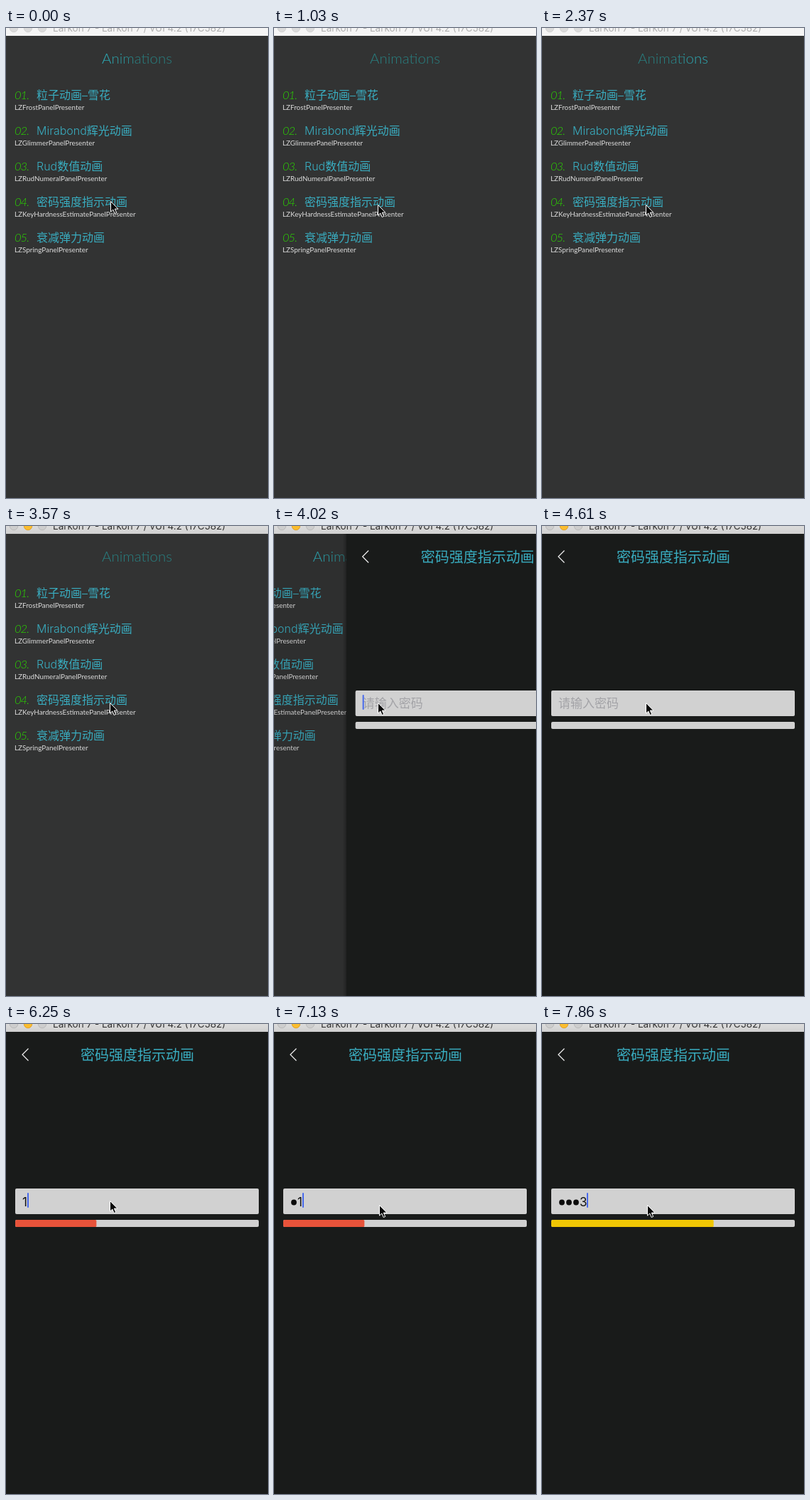
Animation of 369x660 px, one loop 8000 ms. Source, as an HTML page:

```html
<!DOCTYPE html>
<html lang="zh-CN">
<head>
<meta charset="utf-8">
<title>Animations</title>
<style>
  html, body { margin: 0; width: 100%; height: 100%; overflow: hidden; background: #323333; }
  svg { display: block; width: 100%; height: 100%; }
  text { white-space: pre; }
  .ui { font-family: Inter, "Noto Sans CJK SC", "Noto Sans CJK", "Noto Sans CJK JP", sans-serif; }
  .light { font-weight: 300; }
  .head { font: 300 20.5px Lato, sans-serif; }
  .num { font: italic 300 16.5px Lato, sans-serif; letter-spacing: -1px; fill: #2bd400; }
  .item { font-size: 16px; fill: #39adc0; }
  .sub { font: 400 9.9px Lato, sans-serif; fill: #dcdcdc; }
</style>
</head>
<body>
<svg viewBox="0 0 369 660" xmlns="http://www.w3.org/2000/svg">
  <defs>
    <linearGradient id="shine" gradientUnits="userSpaceOnUse" x1="-50" y1="0" x2="50" y2="0">
      <stop offset="0" stop-color="#277f80"/>
      <stop offset=".5" stop-color="#2cb0bc"/>
      <stop offset="1" stop-color="#277f80"/>
    </linearGradient>
    <linearGradient id="chrome" x1="0" y1="0" x2="0" y2="1">
      <stop offset="0" stop-color="#dcdcdc"/>
      <stop offset="1" stop-color="#d0d0d0"/>
    </linearGradient>
    <linearGradient id="edge">
      <stop offset="0" stop-color="#000" stop-opacity="0"/>
      <stop offset="1" stop-color="#000" stop-opacity=".25"/>
    </linearGradient>
    <clipPath id="track"><rect x="13" y="275" width="343" height="10" rx="2"/></clipPath>
  </defs>

  <rect width="369" height="660" fill="#323333"/>
  <g id="menu">
    <text class="head" x="184.5" y="50" text-anchor="middle" fill="url(#shine)">Animations</text>
    <g id="list"></g>
  </g>
  <rect id="dim" y="11" width="369" height="649" fill="#000"/>

  <g id="page">
    <rect x="-5" y="11" width="5" height="649" fill="url(#edge)"/>
    <rect y="11" width="369" height="649" fill="#191b1a"/>
    <path d="M31.5 34.5L23 43L31.5 51.5" fill="none" stroke="#f2f2f2" stroke-width="1.2"/>
    <text class="ui light" x="105" y="50.5" font-size="20" fill="#39adc0">密码强度指示动画</text>
    <rect x="13" y="231" width="343" height="36" rx="2" fill="#d1d1d1"/>
    <text id="hint" class="ui" x="23" y="254.5" font-size="17" fill="#a3a3a7">请输入密码</text>
    <g id="dots"></g>
    <text id="digit" class="ui" y="255.5" font-size="17" fill="#111"></text>
    <rect id="caret" y="237" width="2" height="21" rx="1" fill="#4769ec"/>
    <rect x="13" y="275" width="343" height="10" rx="2" fill="#d1d1d1"/>
    <g clip-path="url(#track)"><rect id="bar" x="13" y="275" height="10" rx="1.5"/></g>
  </g>

  <g id="window">
    <rect id="top" width="369" height="11"/>
    <circle cx="11" cy="0" r="5.7"/>
    <circle id="mid" cx="31" cy="0" r="5.7"/>
    <circle cx="51" cy="0" r="5.7"/>
    <text id="caption" class="ui" x="66" y="5.3" font-size="13.5">Larkon 7 - Larkon 7 / vUI 4.2 (17C582)</text>
  </g>
  <path id="arrow" d="M0 0V14.6L3.3 11.5L5.7 17L8.2 15.9L5.8 10.6H10.4Z"
        fill="#080808" stroke="#fff" stroke-width="1" stroke-linejoin="round"/>
</svg>
<script>
const LOOP = 8000, STEP = 148.3, WIDTH = 369;
const $ = id => document.getElementById(id);
const set = (id, attrs) => {
  for (const k in attrs) $(id).setAttribute(k, attrs[k]);
};

const items = [
  ['粒子动画–雪花', 'Frost'],
  ['Mirabond辉光动画', 'Glimmer'],
  ['Rud数值动画', 'RudNumeral'],
  ['密码强度指示动画', 'KeyHardnessEstimate'],
  ['衰减弹力动画', 'Spring']
];
$('list').innerHTML = items.map(([label, kind], i) => `
  <g transform="translate(0 ${i * 50})">
    <text class="num" x="12" y="99.5">0${i + 1}.</text>
    <text class="ui light item" x="43" y="99.5">${label}</text>
    <text class="sub" x="12" y="114.8">LZ${kind}PanelPresenter</text>
  </g>`).join('');
$('dots').innerHTML = [0, 1, 2].map(i =>
  `<circle cx="${28 + i * 10}" cy="250.5" r="3.9" fill="#0c0c0c"/>`).join('');

// Last entry whose start time has passed
const at = (t, keys) => keys.filter(k => t >= k[0]).slice(-1)[0];

// Damped spring from 0 to 1 with a slight overshoot; s in seconds
function spring(s) {
  if (s <= 0) return 0;
  const a = 17.5, b = 15.7;
  return 1 - Math.exp(-a * s) * (Math.cos(b * s) + a / b * Math.sin(b * s));
}

// Critically damped page slide; s in seconds
function slide(s) {
  if (s <= 0) return 0;
  const w = 18.26 * s, p = 1 - (1 + w) * Math.exp(-w);
  return p > .998 ? 1 : p;
}

function mix(c1, c2, p) {
  const k = Math.min(1, Math.max(0, p));
  return `rgb(${c1.map((v, i) => Math.round(v + (c2[i] - v) * k))})`;
}

const pointer = [[0, 147.5, 243.5], [1025, 146.5, 248.5], [6985, 147.5, 252.5], [7125, 148.5, 254.5]];
// start, masked characters, visible digit, caret x
const typing = [[0, 0, '', 23], [5940, 0, '1', 30], [6535, 1, '', 33],
  [6835, 1, '1', 40], [7275, 2, '2', 53], [7565, 3, '3', 63]];
const blink = [[0, 1], [4600, 0], [5045, 1], [5495, .5], [5645, 0], [5940, 1]];

function draw(t) {
  const q = Math.floor((t + 10) / STEP) * STEP;

  const phase = q % 2000;
  set('shine', { gradientTransform: `translate(${phase < 700 ? 138 + phase * .235 : -100} 0)` });

  const p = slide((q - 3864) / 1000);
  set('menu', { transform: `translate(${-.3 * WIDTH * p} 0)` });
  set('dim', { opacity: .1 * p });
  set('page', { transform: `translate(${WIDTH * (1 - p)} 0)`, visibility: p ? 'visible' : 'hidden' });

  const active = t >= 3565;
  set('top', { fill: active ? 'url(#chrome)' : '#f5f5f5' });
  set('window', { fill: active ? '#cdcdcd' : '#dcdcdc' });
  document.querySelectorAll('#window circle').forEach(c =>
    c.setAttribute('stroke', active ? '#b9b9b9' : '#d2d2d2'));
  if (active) set('mid', { fill: '#fbbd2e', stroke: '#e0a22c' });
  else $('mid').removeAttribute('fill');
  set('caption', { fill: active ? '#333' : '#b0b0b0' });

  const [, masked, digit, caretX] = at(t, typing);
  set('hint', { visibility: t < 5940 ? 'inherit' : 'hidden' });
  [...$('dots').children].forEach((c, i) =>
    c.setAttribute('visibility', i < masked ? 'inherit' : 'hidden'));
  set('digit', { x: 23 + masked * 10 });
  $('digit').textContent = digit;
  set('caret', { x: caretX, opacity: at(t, blink)[1] });

  const weak = spring((q - 5880) / 1000), fair = spring((q - 7510) / 1000);
  set('bar', { width: 343 / 3 * (weak + fair), fill: mix([232, 83, 58], [240, 199, 4], fair * 1.5) });

  const [, x, y] = at(t, pointer);
  set('arrow', { transform: `translate(${x} ${y})` });
}

function tick(now) {
  draw(now % LOOP);
  requestAnimationFrame(tick);
}
draw(0);
requestAnimationFrame(tick);
</script>
</body>
</html>
```
